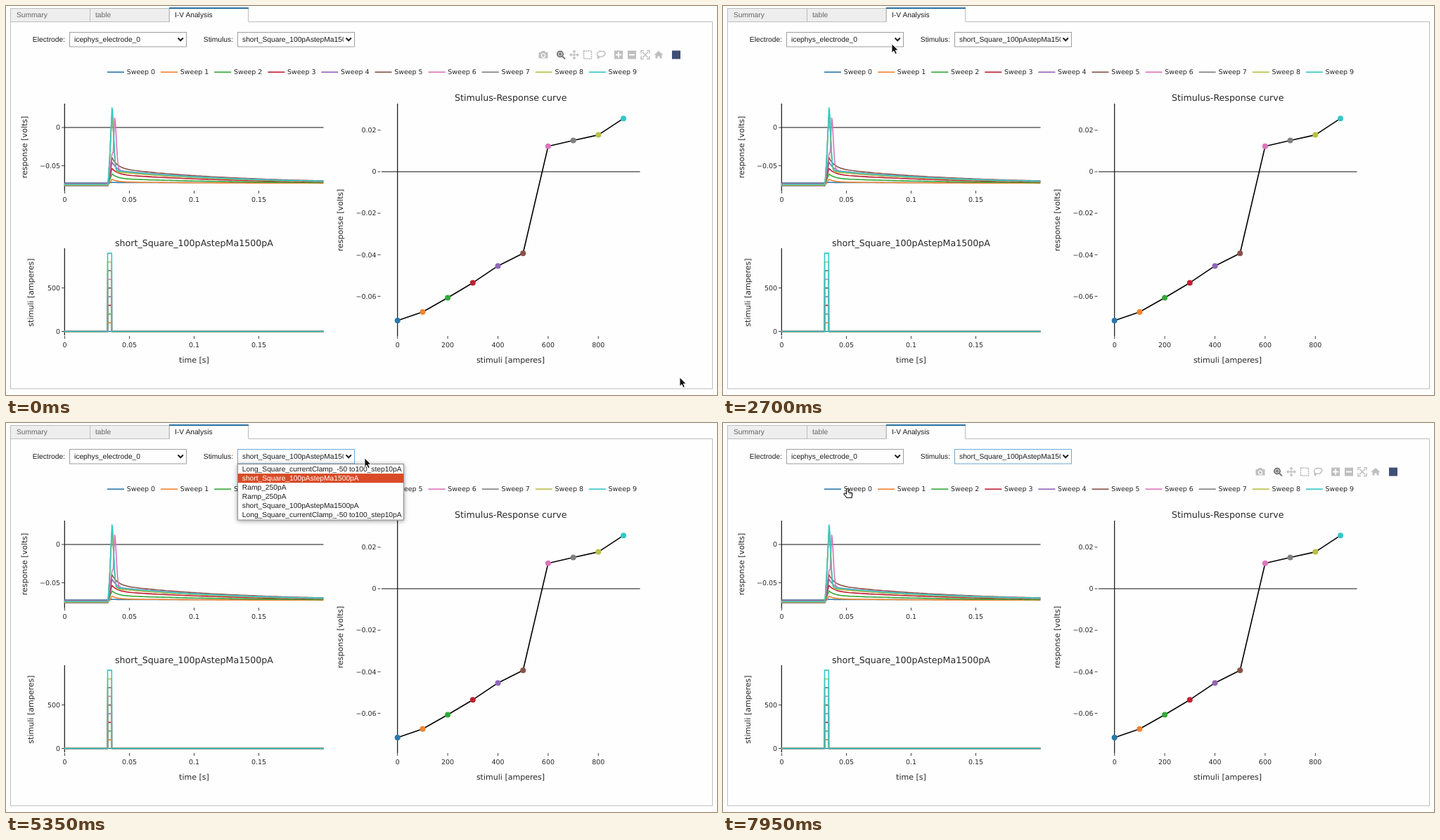
These frames come from a looping animation (1011 by 554 pixels, 8 s). An HTML page:

```html
<!DOCTYPE html>
<html>
<head>
<meta charset="utf-8">
<style>
  html, body { margin: 0; width: 100%; height: 100%; overflow: hidden; background: #fefefe; }
  svg { display: block; width: 1011px; height: 554px; }
  text { white-space: pre; text-rendering: geometricPrecision; }
  .ui { font: 10.26px "Liberation Sans", Arial, sans-serif; fill: #1c1c1c; }
  .plot { font: 9.47px "DejaVu Sans", sans-serif; fill: #282828; }
  .plot .axis { font-size: 11.04px; }
  .plot .title { font-size: 12.63px; }
  .end { text-anchor: end; }
  .mid { text-anchor: middle; }
  .line { fill: none; stroke-width: 1.6; stroke-linejoin: round; }
  .popup { filter: drop-shadow(0 1px 3px rgba(0, 0, 0, .4)); }
</style>
</head>
<body>
<svg id="stage" viewBox="0 0 1011 554"></svg>
<script>
const stage = document.getElementById('stage');
const colors = ['#2b78ab', '#f08230', '#34a83a', '#bf2033', '#9065b8', '#875249', '#db74bd', '#7f7f7f', '#b9c042', '#35c6c9'];

const text = (x, y, s, cls = '', extra = '') => `<text x="${x}" y="${y}" class="${cls}" ${extra}>${s}</text>`;
const path = (d, stroke, extra = '') => `<path d="${d}" fill="none" stroke="${stroke}" ${extra}/>`;
const rect = (x, y, w, h, fill, stroke = 'none', extra = '') =>
  `<rect x="${x}" y="${y}" width="${w}" height="${h}" fill="${fill}" stroke="${stroke}" ${extra}/>`;
const polyline = (points, color) => `<polyline class="line" points="${points.join(' ')}" stroke="${color}"/>`;
const vertical = (x, y, s) => text(0, 0, s, 'axis mid', `transform="translate(${x} ${y}) rotate(-90)"`);

function tabs() {
  return rect(6.5, 22.5, 998, 522.5, '#fefefe', '#bdbdbd') +
    rect(6.5, 3.5, 113, 19, '#eee', '#bdbdbd') + rect(119.5, 3.5, 112.5, 19, '#eee', '#bdbdbd') +
    rect(232, 3, 113, 20.5, '#fefefe') + path('M232.5 23V3M344.5 3V22.5', '#bdbdbd') +
    rect(232, 2, 113, 2, '#27709f') +
    text(15, 16, 'Summary', '', 'fill="#666"') + text(127, 16, 'table', '', 'fill="#666"') +
    text(240, 16, 'I-V Analysis');
}

function select(id, x, label, value) {
  return text(x - 6, 51.2, label, 'end') +
    rect(x + .5, 37.5, 166, 20.5, '#fefefe', '#9e9e9e', `id="${id}"`) +
    `<svg x="${x}" y="36" width="151" height="24">${text(7, 15.2, value)}</svg>` +
    path(`M${x + 154.5} 45.5l3.7 3.8 3.7-3.8`, '#222', 'stroke-width="2"');
}

const rowHeight = 13.1;
function popup(id, x, width, rows) {
  const height = rows.length * rowHeight + 1;
  return `<g id="${id}" class="ui popup">` +
    rect(x + .5, 58.5, width - 1, height, '#fefefe', '#8c8c8c') +
    rect(x + 1, 59, width - 2, rowHeight, '#d94a26', 'none', 'class="mark"') +
    rows.map((s, i) => text(x + 6.8, 68.8 + i * rowHeight, s)).join('') + '</g>';
}

function toolbar() {
  const icons = [
    [764, '<path d="M-6.5-3.5h3l1.5-2h4l1.5 2h3v8.5h-13z" fill="#bfbfbf"/><circle cy="1" r="2.6" fill="#bfbfbf" stroke="#fff" stroke-width="1.3"/>'],
    [789, '<circle cx="-1" cy="-1" r="4" fill="#ddd" stroke="#777" stroke-width="2"/><path d="M2 2l4 4M-3-1h4M-1-3v4" stroke="#777" stroke-width="1.8"/>'],
    [808, path('M-5.5 0H5.5M0-5.5V5.5M-4-2l-2 2 2 2M4-2l2 2-2 2M-2-4l2-2 2 2M-2 4l2 2 2-2', '#bfbfbf', 'stroke-width="1.3"')],
    [827, path('M-5.5-5.5h11v11h-11z', '#b5b5b5', 'stroke-width="1.5" stroke-dasharray="2 1"')],
    [846, path('M-4 2C-8-2-3-6 2-5 7-5 7 0 3 2 0 4-2 2-4 2c-2 1-1 3 1 2l-1 2', '#bfbfbf', 'stroke-width="1.4"')],
    [871, rect(-6, -6, 12, 12, '#bfbfbf') + path('M-4 0h8M0-4v8', '#fff', 'stroke-width="1.8"')],
    [890, rect(-6, -6, 12, 12, '#bfbfbf') + path('M-4 0h8', '#fff', 'stroke-width="1.8"')],
    [909, path('M-6-2v-4h4M2-6h4v4M6 2v4h-4M-2 6h-4v-4M-4-4l8 8M4-4l-8 8', '#bfbfbf', 'stroke-width="1.5"')],
    [928, '<path d="M-6.5 0L0-5.5 6.5 0H4.5v5H1.5V2h-3v3h-3V0z" fill="#bfbfbf"/>'],
    [953, rect(-6, -6, 12, 12, '#3f4f75')]
  ];
  return '<g id="toolbar">' + icons.map(([x, s]) => `<g transform="translate(${x} 69.5)">${s}</g>`).join('') + '</g>';
}

function legend() {
  return colors.map((c, i) => {
    const x = 144 + i * 76.1;
    return path(`M${x} 94.2h24`, c, 'stroke-width="1.6"') + text(x + 27.7, 97.4, 'Sweep ' + i);
  }).join('');
}

const xTicks = (y, ticks) => ticks.map(([x, s]) =>
  path(`M${x} ${y}v4`, '#444') + text(x, y + 15.7, s, 'mid')).join('');
const yTicks = (x, ticks) => ticks.map(([y, s]) =>
  path(`M${x} ${y}h-4`, '#444') + text(x - 6, y + 3.3, s, 'end')).join('');

const curve = [[556.7, 448], [592.4, 435.7], [628.1, 415.5], [663.8, 394.2], [699.5, 370.2],
  [735.2, 352.2], [770.9, 199.7], [806.6, 191.5], [842.3, 183.6], [878, 160.2]];

// Membrane response: fast peak after the pulse plus a slow decay
function response(i) {
  const peak = 173 - 1090 * (236 - curve[i][1]) / 2957;
  const rest = i ? 253 + (i * 7 % 10) / 3 : 252;
  const base = i ? 252.7 : 251.5;
  const spike = i > 5;
  const slow = spike ? 19 - (i % 3) : i && [2, 7, 13, 17, 22][i - 1];
  const fast = base - peak - slow;
  const top = i === 6 ? 154.5 : 150.7;
  const points = [[83, rest], [145, rest]];
  if (i === 6) points.push([149, 222], [151, 210], [152.5, 208]);
  else if (spike) points.push([147.5, 216], [149.3, 178]);
  for (let x = top; x <= 451.5; x += x < 175 ? .6 : 4) {
    const d = x - top;
    const decay = spike ? Math.exp(-((d / 3.3) ** 2)) : Math.exp(-d / 8);
    points.push([x.toFixed(1), (base - fast * decay - slow * Math.exp(-d / 170)).toFixed(1)]);
  }
  return polyline(points, colors[i]);
}

function pulse(i) {
  const top = 463.5 - 12.38 * i;
  return polyline([[83, 463.5], [144.5, 463.5], [144.5, top], [150.3, top], [150.3, 463.5], [451.5, 463.5]], colors[i]);
}

function plots() {
  const time = [[83.5, '0'], [175.5, '0.05'], [267.5, '0.1'], [359.5, '0.15']];
  const volts = [.02, 0, -.02, -.04, -.06].map((v, i) =>
    [236 - v * 2957, v ? v.toFixed(2).replace('-', '−') : '0']);
  const amps = [0, 200, 400, 600, 800].map(a => [556.7 + a * .357, a]);
  return path('M83.3 139V263M83 173H451.5M83.3 345V469', '#111', 'stroke-width="1.2"') +
    path('M556.7 139V470M534 236H901.5', '#111', 'stroke-width="1.2"') +
    yTicks(83, [[173, '0'], [227.5, '−0.05']]) + xTicks(263, time) +
    yTicks(83, [[463.5, '0'], [401.5, '500']]) + xTicks(470, time) +
    yTicks(532.5, volts) + xTicks(470, amps) +
    colors.map((c, i) => response(i) + pulse(i)).join('') +
    polyline(curve, '#000') +
    curve.map(([x, y], i) => `<circle cx="${x}" cy="${y}" r="4" fill="${colors[i]}"/>`).join('') +
    text(267.5, 342, 'short_Square_100pAstepMa1500pA', 'title mid') +
    text(717.7, 134.6, 'Stimulus-Response curve', 'title mid') +
    text(267.5, 507.5, 'time [s]', 'axis mid') + text(717.5, 507.5, 'stimuli [amperes]', 'axis mid') +
    vertical(30, 201, 'response [volts]') + vertical(39.3, 408, 'stimuli [amperes]') +
    vertical(478.5, 305, 'response [volts]');
}

const pointers = {
  arrow: '<path d="M0 0V12.5L2.9 9.9 5 14.5 7.2 13.5 5.2 9H9.2z" fill="#111" stroke="#fff" stroke-width=".8"/>',
  cross: path('M-7 0H7M0-7V7', '#fff', 'stroke-width="3"') + path('M-7 0H7M0-7V7', '#111', 'stroke-width="1.6"'),
  hand: '<path d="M-2 7V1Q-2-.5-.7-.5 .7-.5.7 1V4.5L5 5Q6.5 5.5 6.3 7L5.5 12.5H-1.5L-5.5 7.5Q-5.5 5.8-4 6z" fill="#fff" stroke="#111" stroke-width="1.2" stroke-linejoin="round"/><path d="M2.5 5v2.5M4.5 5.3v2.2" stroke="#111" stroke-width=".8"/>'
};

const long = 'Long_Square_currentClamp_-50 to100_step10pA';
const short = 'short_Square_100pAstepMa1500pA';
stage.innerHTML =
  `<g class="ui">${tabs()}${select('electrode', 90, 'Electrode:', 'icephys_electrode_0')}${select('stimulus', 329, 'Stimulus:', short)}</g>` +
  `<g class="plot">${toolbar()}${legend()}${plots()}</g>` +
  popup('electrodeList', 90, 167, ['icephys_electrode_0', 'icephys_electrode_1']) +
  popup('stimulusList', 329, 237, [long, short, 'Ramp_250pA', 'Ramp_250pA', short, long]) +
  '<g id="pointer"></g>';

const $ = id => document.getElementById(id);
const within = (v, a, b) => v >= a && v < b;

// Pointer waypoints: time, x, y
const route = [
  [50, 958, 529], [400, 953, 537], [750, 953, 537], [1450, 606, 374], [1550, 605, 366], [1600, 605, 366],
  [1750, 536, 280], [1850, 536, 280], [2300, 214, 150], [2700, 240, 54], [3950, 240, 54], [4300, 405, 53],
  [4500, 410, 52], [4800, 427, 46], [4850, 431, 46], [5050, 431, 46], [5100, 474, 46], [5300, 474, 46],
  [5350, 510, 50], [5450, 517, 52], [5600, 517, 52], [6200, 475, 78], [6550, 475, 78], [6900, 330, 152],
  [7350, 212, 138], [7400, 212, 138], [7450, 202, 137], [7600, 202, 137], [7950, 177.5, 94]
];
const fades = [[50, 1], [400, 0], [850, 0], [1150, 1], [2350, 1], [2650, 0], [6600, 0], [6900, 1]];

function sample(keys, t) {
  const n = keys.findIndex(k => k[0] >= t);
  if (n < 1) return keys.at(n).slice(1);
  const a = keys[n - 1], b = keys[n], k = (t - a[0]) / (b[0] - a[0]);
  return a.slice(1).map((v, i) => v + (b[i + 1] - v) * k);
}

function pointerKind(x, y) {
  const onPlot = within(x, 534, 902) && within(y, 139, 470) ||
    within(x, 83, 452) && (within(y, 139, 263) || within(y, 345, 470));
  if (onPlot) return 'cross';
  return within(y, 86, 103) && within(x, 144, 905) ? 'hand' : 'arrow';
}

let shown;
function draw(now) {
  const t = Math.floor(now % 8000 / 50) * 50;
  const [x, y] = sample(route, t);
  const kind = pointerKind(x, y);
  if (kind !== shown) $('pointer').innerHTML = pointers[shown = kind];
  $('pointer').setAttribute('transform', `translate(${x} ${y})`);
  $('toolbar').setAttribute('opacity', sample(fades, t)[0]);

  const border = focused => focused ? '#6ea8d6' : '#9e9e9e';
  $('electrode').setAttribute('stroke', border(within(t, 2850, 4550)));
  $('stimulus').setAttribute('stroke', border(t >= 4550));
  $('electrodeList').style.display = within(t, 2900, 3650) ? '' : 'none';
  $('stimulusList').style.display = within(t, 4550, 6550) ? '' : 'none';

  const row = y > 59 && x < 565 ? Math.floor((y - 59) / rowHeight) : 1;
  for (const [id, marked] of [['electrodeList', 0], ['stimulusList', row]]) {
    $(id).querySelector('.mark').setAttribute('y', 59 + marked * rowHeight);
    $(id).querySelectorAll('text').forEach((e, i) => e.style.fill = i === marked ? '#fff' : '');
  }
  requestAnimationFrame(() => draw(performance.now() - start));
}
const start = performance.now();
draw(0);
</script>
</body>
</html>
```
